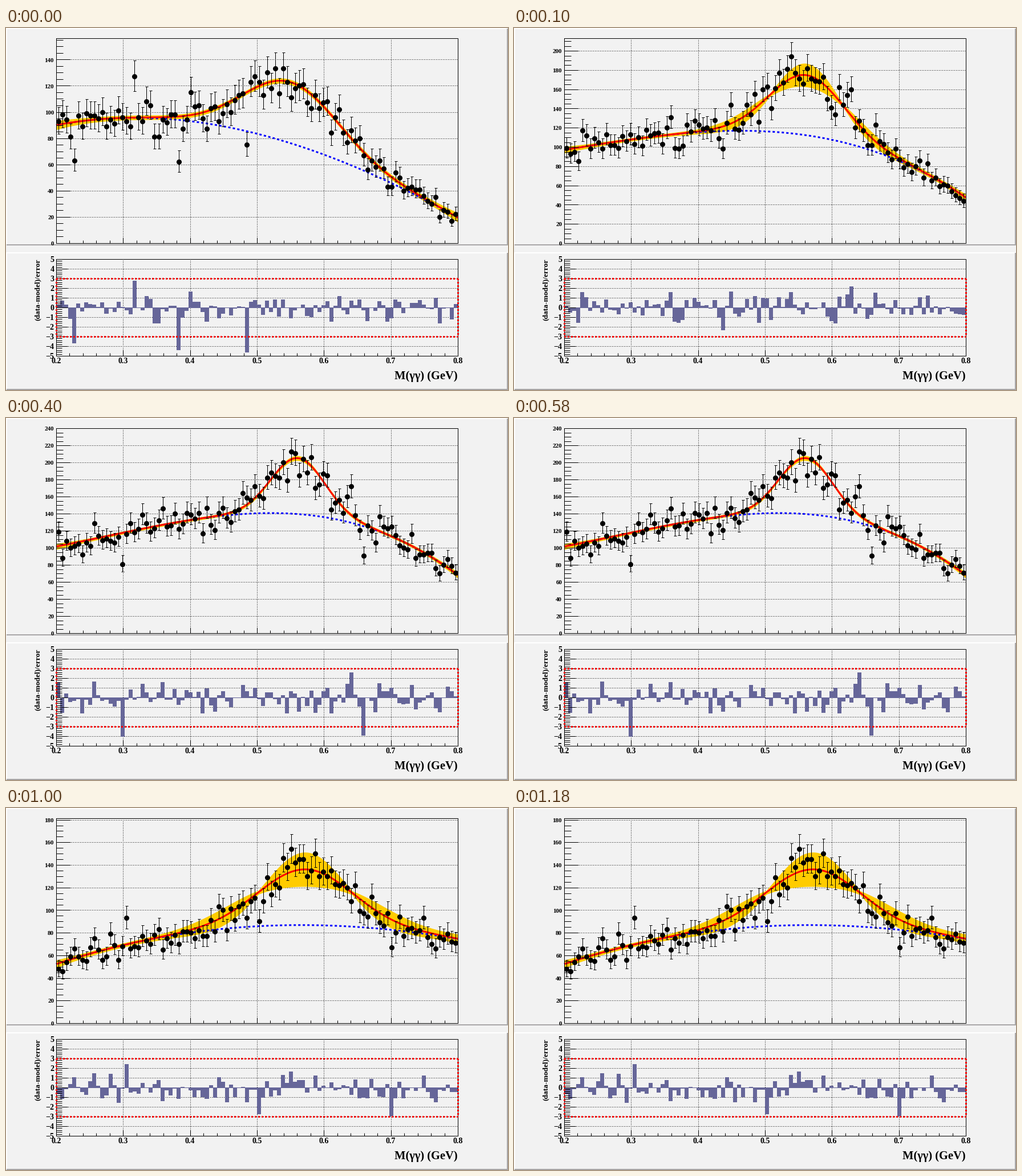
Recreate the animation shown at these times as a matplotlib script. Size 880 by 636 pixels, loop 1.3 s.

```python
import matplotlib.pyplot as plt
import numpy as np
from matplotlib.animation import FuncAnimation
from matplotlib.patches import Rectangle

W, H, DPI = 880, 636, 80
PX = 72 / DPI  # points per pixel
LEFT, RIGHT = 88, 792
TOP, BASE = 18, 378          # fit panel
RES_TOP, RES_BASE = 406, 576  # residual panel
BINS = 100
BG, SHADE, BAR = "#f2f2f2", "#a8a6a7", "#666699"

plt.rcParams.update({
    "font.family": "Liberation Serif",
    "font.weight": "bold",
    "lines.scale_dashes": False,
    "lines.dash_capstyle": "butt",
})

# y range, background at 0.2/0.4/0.6/0.8, peak (height, mean, sigma),
# swelling of the error band, strongest pulls by bin
FITS = [
    (156.2, (90, 93, 67.5, 19.5), (46.5, .551, .070), .3,
     {4: -3.7, 19: 2.75, 30: -4.35, 47: -4.7}),
    (213.1, (97, 115.3, 107.5, 47.5), (62.5, .562, .055), 10.5,
     {39: -2.4, 71: 2.15}),
    (240.1, (101.5, 132.5, 136, 68), (65.5, .561, .040), 1.2,
     {16: -4, 73: 2.6, 76: -4}),
    (194.4, (69.5, 88.8, 93.3, 69), (47.7, .565, .070), .4,
     {0: 2.6, 44: -2.85, 94: -3.9}),
    (181.3, (52.3, 80, 86.5, 74.5), (49.3, .572, .070), 13.5,
     {17: 2.4, 50: -2.75, 83: -3}),
]

fig = plt.figure(figsize=(W / DPI, H / DPI), dpi=DPI, facecolor=BG)
ax = fig.add_axes([0, 0, 1, 1])
ax.set_autoscale_on(False)
ax.set_xlim(0, W)
ax.set_ylim(H, 0)
ax.axis("off")


def to_x(mass):
    return LEFT + (RIGHT - LEFT) * (mass - .2) / .6


def to_res(pull):
    mid = (RES_TOP + RES_BASE) / 2
    return mid - (RES_BASE - RES_TOP) / 10 * pull


def line(xs, ys, color="k", lw=1, dash=None, z=2):
    # the half pixel offset puts dash ends on pixel edges
    style = (.5 * PX, [d * PX for d in dash]) if dash else "-"
    return ax.plot(xs, ys, color=color, lw=lw * PX, ls=style, zorder=z,
                   solid_capstyle="butt")[0]


def grid(xs, ys):
    return line(xs, ys, dash=(1, 2), z=1)


def label(x, y, text, size, ha="right", **kw):
    return ax.text(x, y, text, size=size * PX, ha=ha,
                   **{"va": "baseline", "zorder": 9, **kw})


def rect(x, y, w, h, color):
    ax.add_patch(Rectangle((x, y), w, h, fc=color, lw=0, zorder=0))


def frame(top, base):
    line([LEFT, RIGHT, RIGHT, LEFT, LEFT], [top, top, base, base, top], z=6)


def bevel(top, base):
    rect(0, top, W, 2, "white")
    rect(0, top, 2, base - top, "white")
    rect(1, base - 2, W - 1, 2, SHADE)
    rect(W - 2, top + 1, 2, base - top - 1, SHADE)


def draw_static():
    bevel(0, 382)
    bevel(394, H)
    for top, base in ((TOP, BASE), (RES_TOP, RES_BASE)):
        frame(top, base)
        for k in range(31):
            x = to_x(.2 + .02 * k)
            line([x, x], [base, base - (5 if k % 5 else 10)], z=6)
            if k % 5 == 0 and 0 < k < 30:
                grid([x, x], [top, base])
    for k in range(51):
        y = to_res(k / 5 - 5)
        line([LEFT, LEFT + (10 if k % 5 else 20)], [y, y], z=6)
    for v in range(-5, 6):
        y = to_res(v)
        if abs(v) < 5:
            grid([LEFT, RIGHT], [y, y])
        label(84.5, y + 5, str(v).replace("-", "\u2212"), 14)
    for k in range(2, 9):
        label(to_x(k / 10), 589, f"{k / 10:.1f}", 14, "center")
    line([LEFT, RIGHT], [to_res(0)] * 2, BAR, z=3)
    hi, lo = to_res(3), to_res(-3)
    for xs, ys in (((LEFT, RIGHT), (hi, hi)), ((LEFT, RIGHT), (lo, lo)),
                   ((LEFT, LEFT), (hi, lo)), ((RIGHT, RIGHT), (hi, lo))):
        line(xs, ys, "red", 3, (3, 3), z=7)
    label(RIGHT, 616.5, "M(\u03b3\u03b3) (GeV)", 20.5)
    label(56, RES_TOP, "(data-model)/error", 13.5, "center", va="top",
          rotation=90)


def draw_fit(seed, ymax, knots, peak, lobe, strong):
    """Draw one fit with its pulls and return the artists."""
    height, mean, sigma = peak
    cubic = np.polyfit([.2, .4, .6, .8], knots, 3)
    art = []

    def to_y(v):
        return BASE - (BASE - TOP) * v / ymax

    def model(m):
        u = (m - mean) / sigma
        return np.polyval(cubic, m) + height * np.exp(-u * u / 2)

    for v in range(0, int(ymax) + 1, 5):
        y = to_y(v)
        art.append(line([LEFT, LEFT + (12 if v % 20 else 25)], [y, y], z=6))
        if v % 20 == 0:
            art.append(label(84, y + 4.2, str(v), 11))
            if v:
                art.append(grid([LEFT, RIGHT], [y, y]))

    m = np.linspace(.2, .8, 400)
    u = (m - mean) / sigma
    half = (1.7 + 1.8 * np.abs((m - .5) / .3) ** 8
            + lobe * np.abs(1 - u * u) * np.exp(-u * u / 2))
    total = model(m)
    art.append(ax.fill_between(to_x(m), to_y(total - half),
                               to_y(total + half), color="#ffcc00", lw=0,
                               zorder=3))
    art.append(line(to_x(m), to_y(np.polyval(cubic, m)), "blue", 3, (4, 4), 4))
    art.append(line(to_x(m), to_y(total), "red", 3, z=5))

    rng = np.random.default_rng(seed)
    pull = np.clip(rng.normal(0, .9, BINS), -1.6, 1.6)
    pull[list(strong)] = list(strong.values())
    center = .2 + .6 * (np.arange(BINS) + .5) / BINS
    want = model(center)
    # whole counts n that solve (n - want) / sqrt(n) = pull
    count = np.round(((pull + np.sqrt(pull ** 2 + 4 * want)) / 2) ** 2)
    pull = (count - want) / np.sqrt(count)

    scale = (BASE - TOP) / ymax
    up, down = scale * (np.sqrt(count + .75) + 1), scale * np.sqrt(count)
    x = to_x(center)
    points = ax.errorbar(x, to_y(count), yerr=[up, down], fmt="ko",
                         ms=8 * PX, mew=PX, elinewidth=PX, capsize=2.5 * PX,
                         capthick=PX, zorder=8)
    art += points.get_children()
    bars = ax.bar(x, to_res(pull) - to_res(0), (RIGHT - LEFT) / BINS,
                  to_res(0), color=BAR, lw=0, zorder=3, antialiased=False)
    return art + list(bars)


draw_static()
fits = [draw_fit(seed, *fit) for seed, fit in enumerate(FITS, 1)]


def update(n):
    # the first fit stays one step, each other fit three
    current = (n + 2) // 3
    for i, art in enumerate(fits):
        for a in art:
            a.set_visible(i == current)
    return []


anim = FuncAnimation(fig, update, frames=13, interval=100, repeat=True,
                     repeat_delay=0, blit=False)
plt.show()
```
